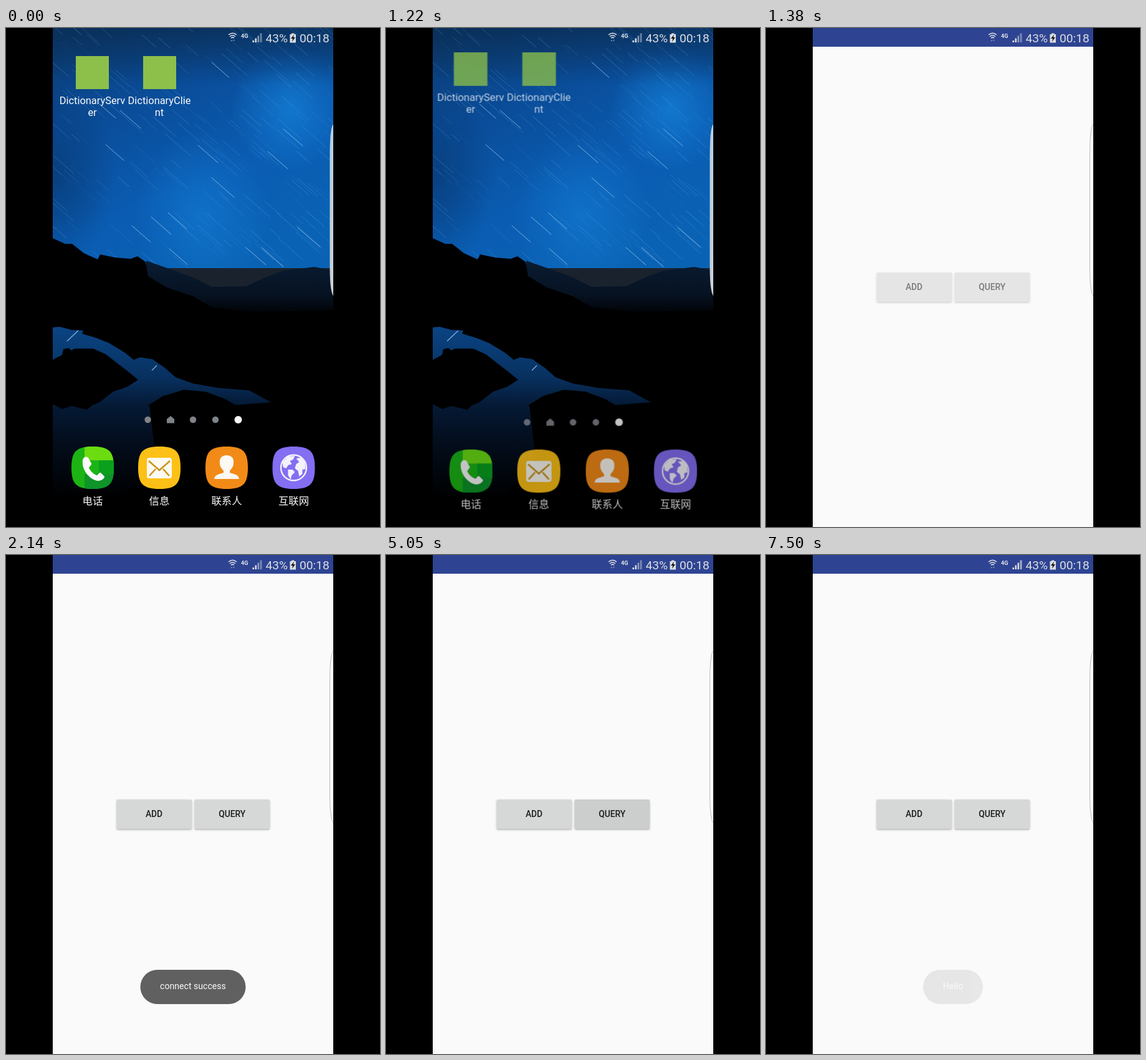
An HTML page that plays this animation: 600x800 px, repeating every 7580 ms.

```html
<!DOCTYPE html>
<html lang="zh">
<head>
<meta charset="utf-8">
<title>Dictionary client</title>
<style>
  html, body { margin: 0; width: 100%; height: 100%; overflow: hidden; background: #000; }
  svg { display: block; width: 100%; height: 100%; }
  text { font-family: Roboto, "Noto Sans CJK SC", "Noto Sans CJK", sans-serif; }
  .label { font-size: 16.4px; fill: #fafafa; text-anchor: middle; }
  .status { font-size: 19.2px; fill: #dcdee2; }
  .button { font-size: 13.8px; font-weight: 500; fill: #1c1c1c; text-anchor: middle; }
  .toast { font-size: 14.1px; fill: #fafafa; text-anchor: middle; }
  #home, #app { transform-origin: 300px 400px; }
</style>
</head>
<body>
<svg viewBox="0 0 600 800">
  <defs>
    <clipPath id="phone"><path d="M75 0H525V800H75z"/></clipPath>
    <clipPath id="skyArea"><path d="M75 0H525V388H75z"/></clipPath>
    <path id="tile" d="M0-34C26-34 34-26 34 0S26 34 0 34-34 26-34 0-26-34 0-34z"/>
    <clipPath id="tileClip"><use href="#tile"/></clipPath>
    <linearGradient id="sky" x1="0" y1="0" x2=".5" y2="1">
      <stop offset="0" stop-color="#0a3a70"/><stop offset=".35" stop-color="#0a4c98"/>
      <stop offset=".7" stop-color="#0a5cb2"/><stop offset="1" stop-color="#0a62b4"/>
    </linearGradient>
    <linearGradient id="topShade" x1="0" y1="0" x2="0" y2="1">
      <stop offset="0" stop-color="#0a2c52" stop-opacity=".75"/><stop offset="1" stop-color="#0a2c52" stop-opacity="0"/>
    </linearGradient>
    <radialGradient id="glow">
      <stop offset="0" stop-color="#1584dc" stop-opacity=".7"/><stop offset="1" stop-color="#1584dc" stop-opacity="0"/>
    </radialGradient>
    <radialGradient id="leftShade">
      <stop offset="0" stop-color="#083c78" stop-opacity=".8"/><stop offset="1" stop-color="#083c78" stop-opacity="0"/>
    </radialGradient>
    <linearGradient id="hill" x1="0" y1="0" x2="0" y2="1">
      <stop offset="0" stop-color="#0a1c32"/><stop offset=".6" stop-color="#061222"/><stop offset="1" stop-color="#000"/>
    </linearGradient>
    <linearGradient id="lake" x1="0" y1="0" x2="0" y2="1">
      <stop offset="0" stop-color="#0a4484"/><stop offset=".3" stop-color="#08305e"/>
      <stop offset=".45" stop-color="#051a36"/><stop offset=".65" stop-color="#030e1e"/><stop offset="1" stop-color="#000"/>
    </linearGradient>
    <linearGradient id="handle" x1="0" y1="0" x2="0" y2="1">
      <stop offset="0" stop-color="#b4cee4"/><stop offset="1" stop-color="#ccd0d6"/>
    </linearGradient>
    <filter id="shadow" x="-10%" y="-20%" width="120%" height="150%">
      <feDropShadow dx="0" dy="1.5" stdDeviation="1.4" flood-color="#555" flood-opacity=".45"/>
    </filter>
  </defs>

  <rect width="600" height="800"/>
  <g clip-path="url(#phone)">
    <g id="wallpaper">
      <g clip-path="url(#skyArea)">
        <path d="M75 0H525V400H75z" fill="url(#sky)"/>
        <ellipse cx="80" cy="235" rx="95" ry="150" fill="url(#leftShade)"/>
        <ellipse cx="315" cy="300" rx="110" ry="130" fill="url(#glow)" opacity=".7"/>
        <ellipse cx="455" cy="130" rx="95" ry="100" fill="url(#glow)"/>
        <path d="M75 0H525V90H75z" fill="url(#topShade)"/>
        <g id="streaks" stroke-linecap="round"></g>
      </g>
      <path d="M225 385H525V470H225z" fill="#1a222e"/>
      <path d="M225 373L262 386 300 400 330 415 385 414 420 398 445 389 495 383 525 389V464H225z" fill="url(#hill)"/>
      <path d="M75 337L95 346 106 346 125 361 147 371 151 363 175 368 200 370 211 366 224 375 228 398 258 416 300 430 330 448 400 455 525 452V800H75z"/>
      <path d="M75 480L86 479 105 484 124 485 122 490 145 497 165 505 190 520 205 532 215 528 235 531 255 545 272 560 300 570 340 577 390 581 425 600 375 604 230 604 240 690 190 750 75 755z" fill="url(#lake)"/>
      <path d="M75 532L90 524 92 515 100 513 105 517 110 514 140 514 160 523 178 537 195 550 212 564 195 575 172 583 150 600 138 605 130 612 105 606 90 611 75 603zM228 605L252 590 285 580 320 583 352 595 372 607 360 650 260 650 246 615z"/>
      <path d="M98 502L116 485M234 549L242 541" stroke="#8ab4e0" stroke-width="1.2"/>
    </g>

    <g id="home">
      <g fill="#8dc04a">
        <rect x="112" y="45" width="53" height="53"/>
        <rect x="220" y="45" width="53" height="53"/>
      </g>
      <text class="label" x="138.5" y="122">DictionaryServ</text><text class="label" x="138.5" y="140.5">er</text>
      <text class="label" x="246" y="122">DictionaryClie</text><text class="label" x="246" y="140.5">nt</text>

      <g fill="#7f8388">
        <circle cx="227.5" cy="628" r="5.2"/>
        <path d="M258 627L264 622 270 627V633.5H258z"/>
        <circle cx="300" cy="628" r="5.2"/>
        <circle cx="336" cy="628" r="5.2"/>
      </g>
      <circle cx="372.5" cy="628" r="6" fill="#fafafa"/>

      <g transform="translate(139 705)">
        <g clip-path="url(#tileClip)">
          <path d="M-34-34H34V34H-34z" fill="#1cb414"/>
          <path d="M-13-34H34V-12H-13z" fill="#6cdc10"/>
          <path d="M10-12H34V12H10z" fill="#0aa01c"/>
          <path d="M-13 10H34V34H-13z" fill="#0e9428"/>
        </g>
        <path d="M-16-12c1-5 5-7 9-4l5 9c1 2-3 5-4 7 3 6 7 10 13 12 2-1 4-5 6-4l6 6c0 4-6 7-10 7-13-1-27-17-25-33z" fill="#fafafa"/>
      </g>
      <g transform="translate(246 705)">
        <use href="#tile" fill="#fdc016"/>
        <rect x="-20" y="-16" width="40" height="33" rx="4" fill="#fcfaf2"/>
        <path d="M-17-11L0 4 17-11M-16 13L-6 2M16 13L6 2" fill="none" stroke="#cc941c" stroke-width="2.6"/>
      </g>
      <g transform="translate(354 705)">
        <use href="#tile" fill="#f28a18"/>
        <path d="M0-20C8-20 12-15 11-7 11-2 8 1 5 5V8C14 11 19 11 20 18H-20C-19 11-14 11-5 8V5C-8 1-11-2-11-7-12-15-8-20 0-20z" fill="#fcf8f2"/>
      </g>
      <g transform="translate(461.5 705)">
        <use href="#tile" fill="#846ef2"/>
        <circle r="20.5" fill="none" stroke="#f4f2fc" stroke-width="2.4"/>
        <path d="M-18-9L-9-18 2-19-1-13-6-11-3-6-9-4-12 1-17-1zM-9 3L-2 3 2 7-3 12-5 19-9 12zM4-15L12-16 18-9 19 2 14 3 14 10 9 14 7 5 2 1 4-6 9-9z" fill="#f4f2fc"/>
      </g>
      <text class="label" x="139" y="763.5">电话</text><text class="label" x="246" y="763.5">信息</text>
      <text class="label" x="354" y="763.5">联系人</text><text class="label" x="461.5" y="763.5">互联网</text>
    </g>

    <path d="M526 153C520 158 519.5 185 519.5 210V375C519.5 400 520 424 526 431z" fill="url(#handle)"/>

    <g id="app">
      <path d="M75 0H525V800H75z" fill="#fafafa"/>
      <path d="M75 0H525V30H75z" fill="#2e4492"/>
      <path d="M526 153C520 158 519.5 185 519.5 210V375C519.5 400 520 424 526 431z" fill="#fdfdfd" stroke="#a8a8a8" stroke-width=".8"/>
      <g id="buttons">
        <g filter="url(#shadow)" fill="#d6d7d7">
          <rect x="177.5" y="392" width="120.5" height="47" rx="2"/>
          <rect x="302.5" y="392" width="120.5" height="47" rx="2"/>
        </g>
        <rect id="press" x="302.5" y="392" width="120.5" height="47" rx="2" fill="#444"/>
        <text class="button" x="237.5" y="420.3">ADD</text>
        <text class="button" x="362.7" y="420.3">QUERY</text>
      </g>
    </g>

    <g id="connectToast">
      <rect x="215.5" y="665" width="169" height="55" rx="27.5" fill="#606060"/>
      <text class="toast" x="300" y="696">connect success</text>
    </g>
    <g id="helloToast">
      <rect x="252" y="665" width="96" height="55" rx="27.5" fill="#606060"/>
      <text class="toast" x="300" y="696">Hello</text>
    </g>

    <g id="statusBar">
      <path d="M357 11Q363.5 5.5 370 11M359 13.7Q363.5 9.7 368 13.7M361 16.2Q363.5 14 366 16.2" fill="none" stroke="#dcdee2" stroke-width="1.5"/>
      <path d="M360.5 21L362 19 363.5 21zM364 19L365.5 21 367 19z" fill="#8d9bb0"/>
      <text x="377" y="16" font-size="9" font-weight="700" fill="#e2e4e8">4G</text>
      <g fill="#dcdee2">
        <path d="M395.5 20H398V23H395.5zM399.5 16.5H402V23H399.5z"/>
        <path id="bar3" d="M403.5 12.5H406V23H403.5z"/>
        <path id="bar4" d="M407.5 8.5H410.5V23H407.5z"/>
        <path d="M458 8.5H462.5V10H465V23.500H455.5V10H458z"/>
      </g>
      <path d="M462 10.5L457 17H460L459 22 464 15H461z" fill="#15151a"/>
      <text class="status" x="416.5" y="22.7">43%</text>
      <text class="status" x="471" y="22.7">00:18</text>
    </g>
  </g>
</svg>
<script>
const LOOP = 7580;
const BURSTS = [[1000, 1680, 10], [3060, 3520, 7], [5050, 5590, 8], [7190, 7500, 5]];
const byId = id => document.getElementById(id);
const ramp = (t, from, to) => Math.min(1, Math.max(0, (t - from) / (to - from)));
const easeOut = u => 1 - (1 - u) ** 2;
const fade = (id, opacity) => byId(id).setAttribute('opacity', opacity.toFixed(3));
const zoom = (id, scale) => { byId(id).style.transform = `scale(${scale})`; };

function addStreak(x, y, length, opacity, color) {
  const line = document.createElementNS('http://www.w3.org/2000/svg', 'path');
  line.setAttribute('d', `M${x} ${y}l${length} ${length * 0.87}`);
  line.setAttribute('stroke', color);
  line.setAttribute('opacity', opacity);
  byId('streaks').append(line);
}

function drawStreaks() {
  let seed = 7;
  const random = () => (seed = seed * 16807 % 2147483647) / 2147483647;
  for (let i = 0; i < 200; i++) {
    addStreak(50 + random() * 470, random() * 390 - 20, 12 + random() * 30, 0.1 + random() * 0.3, '#5aa8ec');
  }
  const bright = [[233, 303, 32], [260, 296, 30], [410, 352, 35], [385, 352, 32], [445, 162, 31],
    [160, 187, 29], [202, 317, 30], [308, 188, 32], [330, 240, 36], [262, 354, 29],
    [420, 198, 32], [183, 132, 33], [468, 320, 36], [150, 122, 26], [330, 55, 28]];
  for (const [x, y, length] of bright) addStreak(x, y, length, 0.7, '#a8d0f4');
}

// The picture advances in short bursts of even steps and holds in between.
function heldTime(t) {
  const burst = BURSTS.filter(([start]) => t >= start).pop();
  if (!burst) return 0;
  const [start, end, count] = burst;
  const step = (end - start) / (count - 1);
  return start + step * Math.min(count - 1, Math.floor((t - start) / step + 0.1));
}

const toastOpacity = (t, enter, enterEnd, leave) =>
  easeOut(ramp(t, enter, enterEnd)) * (1 - easeOut(ramp(t, leave, leave + 500)));

function render(now) {
  const t = heldTime(now % LOOP);
  const launch = ramp(t, 1000, 1227);
  const open = ramp(t, 1227, 1375);
  zoom('home', 1 + 0.0175 * launch);
  fade('home', 1 - 0.22 * launch);
  zoom('app', 0.95 + 0.05 * easeOut(open));
  fade('app', open);
  fade('buttons', ramp(t, 1170, 1530));
  fade('press', 0.18 * Math.sin(Math.PI * ramp(t, 5000, 5400)));
  fade('connectToast', toastOpacity(t, 1390, 1680, 3040));
  fade('helloToast', toastOpacity(t, 5110, 5590, 7175));
  fade('bar3', t >= 7190 ? 1 : 0.6);
  fade('bar4', t >= 7190 ? 0.7 : 0.45);
}

function tick() {
  render(performance.now());
  requestAnimationFrame(tick);
}

drawStreaks();
tick();
</script>
</body>
</html>
```
